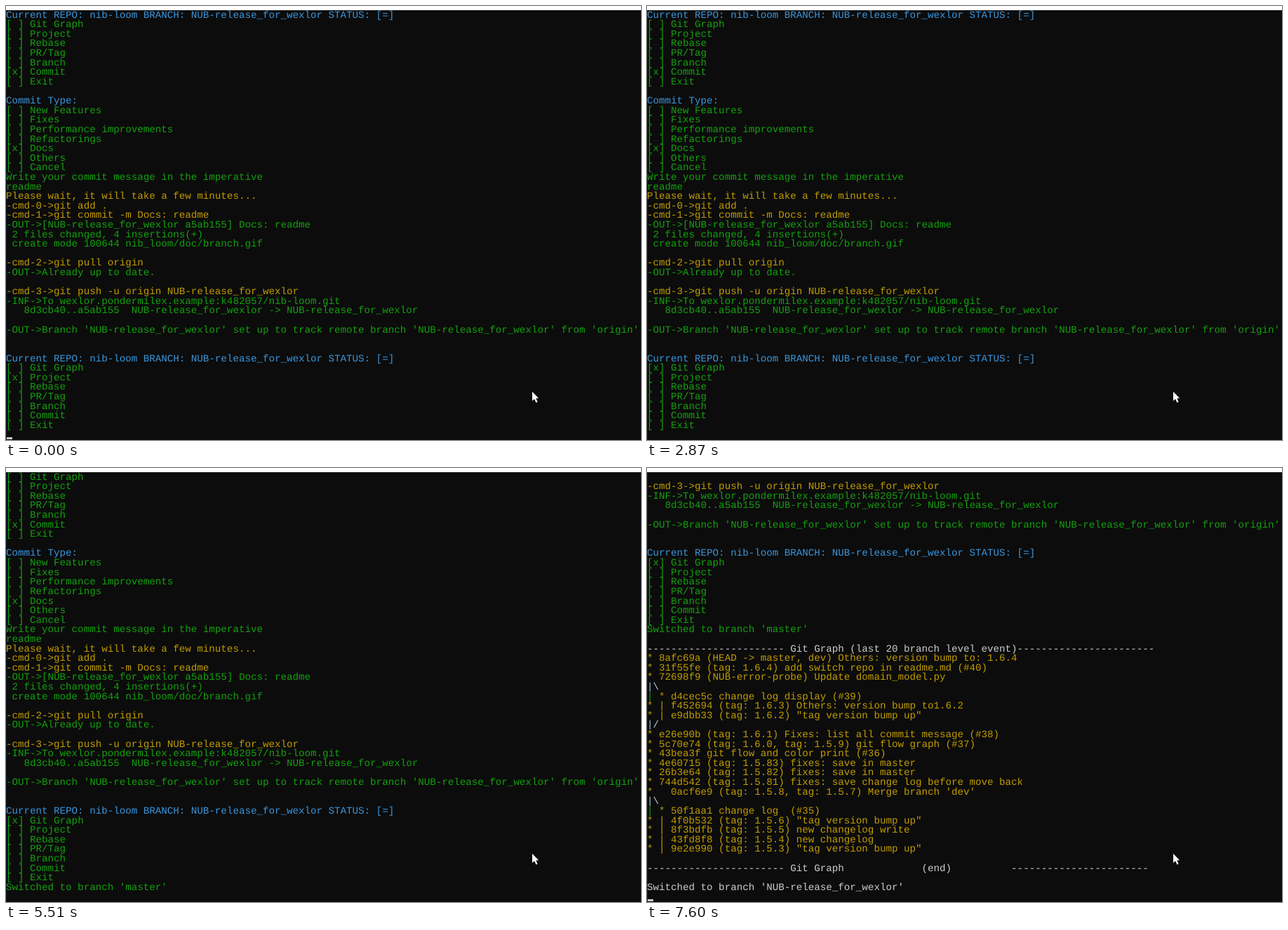
Write an HTML page that moves like this. It is 905 by 619 pixels and loops after 8 s.

```html
<!DOCTYPE html>
<html lang="en">
<head>
<meta charset="utf-8">
<title>Terminal</title>
<style>
  :root { --row: 13.61px; --loop: 8s step-end infinite; }
  html, body { margin: 0; width: 100%; height: 100%; overflow: hidden; background: #0c0c0c; }
  #strip { position: absolute; left: 0; top: 0; width: 100%; height: 6px; background: #fff; }
  #edge { position: absolute; left: 0; top: 6px; bottom: 0; width: 1px; background: #101c28; }
  #view { position: absolute; left: 0; top: 6px; width: 100%; height: calc(var(--row) * 44); overflow: hidden; }
  #log {
    position: absolute; left: 0; top: 0; margin-top: 1.6px;
    font: 14.18px/var(--row) "Liberation Mono", monospace;
    white-space: pre; font-variant-ligatures: none; text-rendering: geometricPrecision;
    animation: scroll var(--loop);
  }
  #log div { height: var(--row); }
  .b { color: #3a96dd; }
  .g, .first, .second { color: #13a10e; }
  .y { color: #c19c00; }
  .w { color: #ccc; }
  .l { color: #8fc1e6; }
  .first { animation: tick var(--loop); }
  .second { animation: untick var(--loop); }
  #caret { position: absolute; left: 1px; top: 615px; width: 8px; height: 3px; background: #ccc; animation: blink var(--loop); }
  #mouse { position: absolute; left: 749px; top: 549px; }

  @keyframes scroll {
    0% { top: 0; }
    60% { top: calc(var(--row) * -1); }
    70.75% { top: calc(var(--row) * -27); }
    78.375%, 100% { top: calc(var(--row) * -28); }
  }
  @keyframes tick { 0% { opacity: 0; } 1.875%, 100% { opacity: 1; } }
  @keyframes untick { 0% { opacity: 1; } 1.875%, 100% { opacity: 0; } }
  @keyframes blink {
    0%, 15.5%, 29.25%, 42.75%, 55.25%, 70.75%, 95%, 100% { opacity: 1; }
    9.75%, 22.375%, 35.875%, 48.5%, 68.875%, 88.125% { opacity: 0; }
  }
</style>
</head>
<body>
<div id="strip"></div>
<div id="view"><div id="log"></div></div>
<div id="edge"></div>
<div id="caret"></div>
<svg id="mouse" width="13" height="20" viewBox="0 0 13 20">
  <path d="M1 1V14.2L4.1 11.4L6.4 16.8L8.6 15.8L6.3 10.6H10.2Z" fill="#fff" stroke="#000" stroke-width=".8" paint-order="stroke"/>
</svg>
<script>
const CELL = 8.51;
const repo = 'nib-loom';
const branch = 'NUB-release_for_wexlor';
const dashes = '-'.repeat(23);
const header = `~bCurrent REPO: ${repo} BRANCH: ${branch} STATUS: [=]`;

// marks: option label -> what stands between its brackets
const options = (names, marks) =>
  names.map(n => `~g[${marks[n] || ' '}] ${n}`).join('\n');
const menu = marks =>
  options(['Git Graph', 'Project', 'Rebase', 'PR/Tag', 'Branch', 'Commit', 'Exit'], marks);
const types = options(
  ['New Features', 'Fixes', 'Performance improvements', 'Refactorings', 'Docs', 'Others', 'Cancel'],
  { Docs: 'x' });

// "~k" switches to the style class for key k
const text = String.raw`${header}
${menu({ Commit: 'x' })}

~bCommit Type:
${types}
~gWrite your commit message in the imperative
~greadme
~yPlease wait, it will take a few minutes...
~y-cmd-0->git add .
~y-cmd-1->git commit -m Docs: readme
~g-OUT->[${branch} a5ab155] Docs: readme
~g 2 files changed, 4 insertions(+)
~g create mode 100644 nib_loom/doc/branch.gif

~y-cmd-2->git pull origin
~g-OUT->Already up to date.

~y-cmd-3->git push -u origin ${branch}
~g-INF->To wexlor.pondermilex.example:k482057/${repo}.git
~g   8d3cb40..a5ab155  ${branch} -> ${branch}

~g-OUT->Branch '${branch}' set up to track remote branch '${branch}' from 'origin'


${header}
${menu({ 'Git Graph': '~1x~g', Project: '~2x~g' })}
~gSwitched to branch 'master'

~w${dashes} Git Graph (last 20 branch level event)${dashes}
~y* 8afc69a (HEAD -> master, dev) Others: version bump to: 1.6.4
~y* 31f55fe (tag: 1.6.4) add switch repo in readme.md (#40)
~y* 72698f9 (NUB-error-probe) Update domain_model.py
~l|~w\
~g|~y * d4cec5c change log display (#39)
~y* | f452694 (tag: 1.6.3) Others: version bump to1.6.2
~y* | e9dbb33 (tag: 1.6.2) "tag version bump up"
~l|~w/
~y* e26e90b (tag: 1.6.1) Fixes: list all commit message (#38)
~y* 5c70e74 (tag: 1.6.0, tag: 1.5.9) git flow graph (#37)
~y* 43bea3f git flow and color print (#36)
~y* 4e60715 (tag: 1.5.83) fixes: save in master
~y* 26b3e64 (tag: 1.5.82) fixes: save in master
~y* 744d542 (tag: 1.5.81) fixes: save change log before move back
~y*   0acf6e9 (tag: 1.5.8, tag: 1.5.7) Merge branch 'dev'
~l|~w\
~g|~y * 50f1aa1 change log  (#35)
~y* | 4f0b532 (tag: 1.5.6) "tag version bump up"
~y* | 8f3bdfb (tag: 1.5.5) new changelog write
~y* | 43fd8f8 (tag: 1.5.4) new changelog
~y* | 9e2e990 (tag: 1.5.3) "tag version bump up"

~w${dashes} Git Graph${' '.repeat(13)}(end)${' '.repeat(10)}${dashes}

~wSwitched to branch '${branch}'`;

const classes = { 1: 'first', 2: 'second' };
const log = document.getElementById('log');

function add(parent, tag, content = '', name = '') {
  const el = document.createElement(tag);
  el.textContent = content;
  el.className = name;
  return parent.appendChild(el);
}

// keep the character grid even where glyph advances get rounded
const probe = add(log, 'span', '0'.repeat(100));
log.style.letterSpacing = CELL - probe.getBoundingClientRect().width / 100 + 'px';
probe.remove();

for (const line of text.split('\n')) {
  const row = add(log, 'div');
  for (const part of line.split('~').slice(1)) {
    add(row, 'span', part.slice(1), classes[part[0]] || part[0]);
  }
}
</script>
</body>
</html>
```
